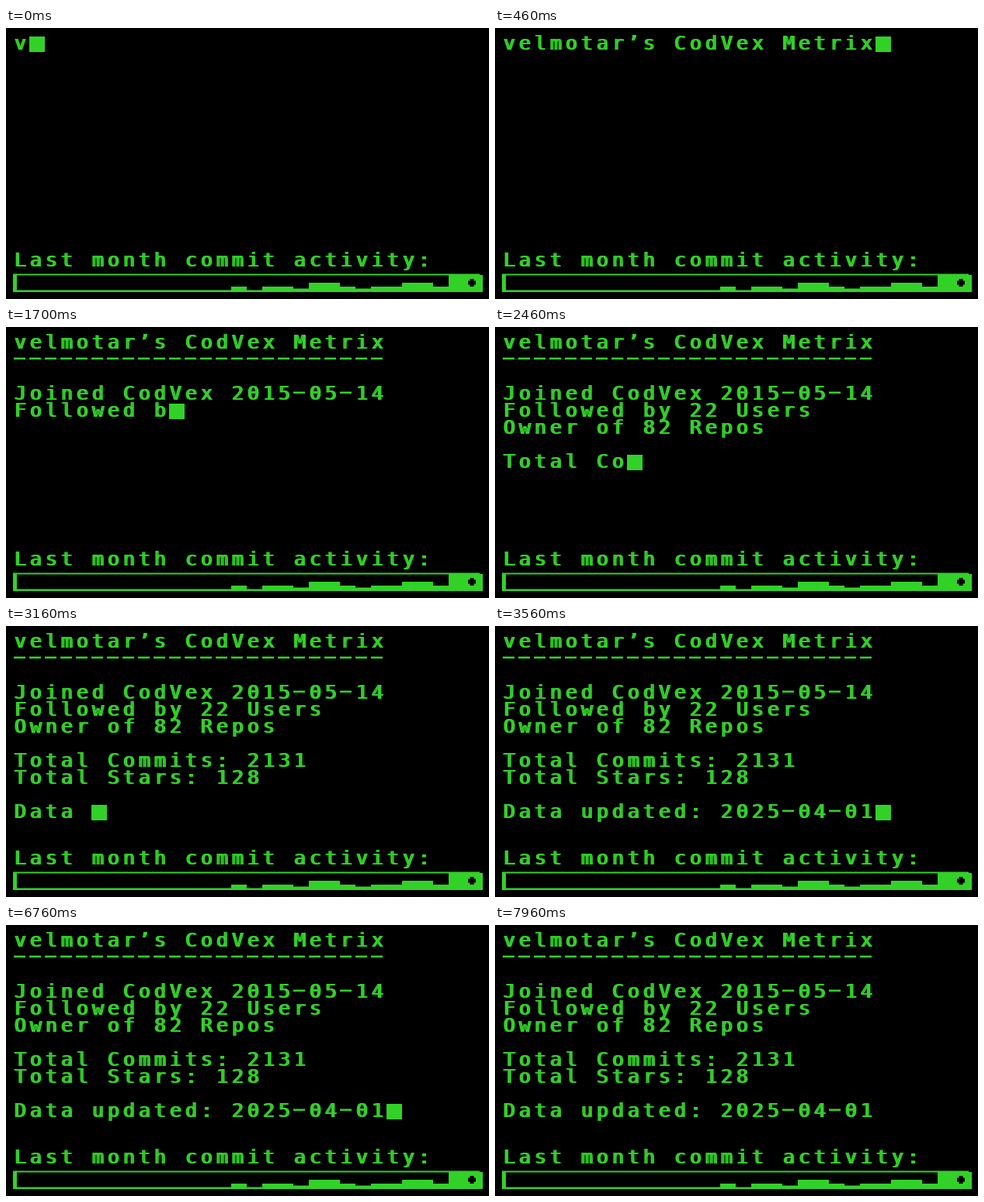
Animation, 622 px wide and 350 px high, one loop 8360 ms. Source, as an HTML page with a canvas:

```html
<!DOCTYPE html>
<html lang="en">
<head>
<meta charset="utf-8">
<title>Terminal stats</title>
<style>
  html, body { margin: 0; width: 100%; height: 100%; overflow: hidden; background: #000; }
  canvas { display: block; }
</style>
</head>
<body>
<canvas id="stage" width="622" height="350"></canvas>
<script>
const ctx = document.getElementById('stage').getContext('2d');
const GREEN = '#32d128', LOOP = 8360, STEP = 20, BLINK = 400, BLINK_START = 3560;
const LEFT = 10, TOP = 11, CELL = 20, LINE = 22;

const script = [
  'velmotar’s CodVex Metrix',
  '-'.repeat(24),
  '',
  'Joined CodVex 2015-05-14',
  'Followed by 22 Users',
  'Owner of 82 Repos',
  '',
  'Total Commits: 2131',
  'Total Stars: 128',
  '',
  'Data updated: 2025-04-01'
].join('\n');

// Runs of the activity chart: [left, right, top]
const bars = [
  [290, 310, 334], [330, 370, 334], [370, 390, 336.5],
  [390, 430, 329], [430, 450, 334], [450, 470, 336.5], [470, 510, 334],
  [510, 550, 329], [550, 570, 334], [570, 614, 319]
];

function box(x1, y1, x2, y2) {
  ctx.fillRect(x1, y1, x2 - x1, y2 - y1);
}

// One character in its fixed cell; hyphens are wide bars.
// Letters are struck twice, which thickens only the upright strokes.
function glyph(ch, x, y) {
  if (ch === '-') {
    ctx.fillRect(x, y + 6.5, 15, 2.5);
  } else {
    for (const dx of [-1, 1]) ctx.fillText(ch, x + 8.5 + dx, y + 16.5);
  }
}

// Prints text and returns the position that follows it
function print(text, x0, y) {
  let x = x0;
  for (const ch of text) {
    if (ch === '\n') {
      x = x0;
      y += LINE;
    } else {
      glyph(ch, x, y);
      x += CELL;
    }
  }
  return [x, y];
}

function chart() {
  box(9, 317.5, 610, 319.5);
  box(9, 318, 14, 341);
  box(9, 338.5, 330, 341);
  for (const [x1, x2, top] of bars) box(x1, top, x2, 341);
  ctx.fillStyle = '#000';
  box(597.5, 324, 602.5, 334);
  box(595, 326.5, 605, 331.5);
  ctx.fillStyle = GREEN;
}

function draw(now) {
  const t = now % LOOP;
  ctx.fillStyle = '#000';
  ctx.fillRect(0, 0, 622, 350);
  ctx.fillStyle = GREEN;
  ctx.font = '25px "DejaVu Sans Mono", monospace';
  ctx.textAlign = 'center';

  const typed = script.slice(0, Math.floor(t / STEP) + 1);
  const [x, y] = print(typed, LEFT, TOP);
  const lit = t < BLINK_START || Math.floor((t - BLINK_START) / BLINK) % 2 === 0;
  if (lit) ctx.fillRect(x, y, CELL, CELL);

  print('Last month commit activity:', LEFT, 291);
  chart();
}

const start = performance.now();
function tick() {
  draw(performance.now() - start);
  requestAnimationFrame(tick);
}
tick();
</script>
</body>
</html>
```
